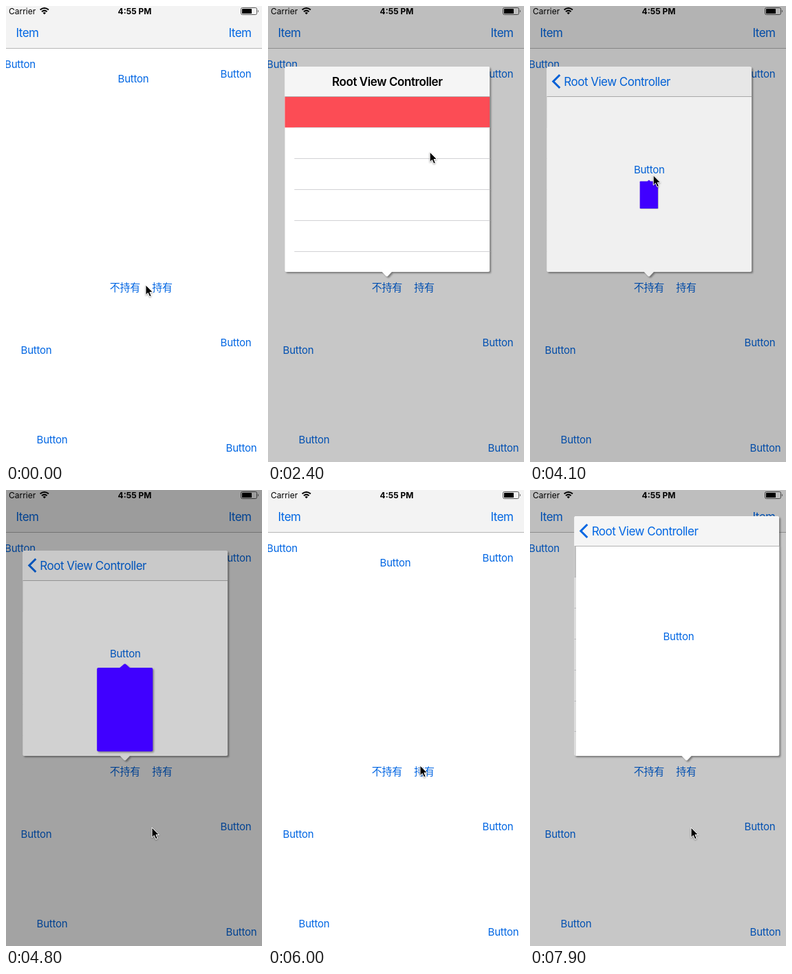
Recreate the animation shown at these times as an HTML page. Size 372 px wide and 662 px high, loop 8000 ms.

```html
<!DOCTYPE html>
<html lang="en">
<head>
<meta charset="utf-8">
<title>Popover demo</title>
<style>
html, body { margin: 0; width: 100%; height: 100%; overflow: hidden; background: #fff; }
svg { display: block; width: 100%; height: 100%; }
text { font-family: Inter, "Noto Sans CJK SC", "Noto Sans CJK", sans-serif; }
.btn { font-size: 15px; letter-spacing: -.24px; fill: #0066e3; text-anchor: middle; }
.nav { font-size: 17px; letter-spacing: -.5px; fill: #0066e3; }
.title { font-size: 17px; font-weight: 600; letter-spacing: -.41px; text-anchor: middle; }
.mid { text-anchor: middle; }
.status { font-size: 12px; }
.pop { filter: drop-shadow(2px 2px 1.2px rgba(0, 0, 0, .38)); }
</style>
</head>
<body>
<svg id="stage" viewBox="0 0 372 662">
  <rect width="372" height="662" fill="#fff"/>
  <rect width="372" height="61" fill="#f3f3f3"/>
  <rect y="61" width="372" height="1" fill="#b6b6b6"/>
  <text class="status" x="4" y="11.5">Carrier</text>
  <text class="status mid" x="187" y="11.5" font-weight="700">4:55 PM</text>
  <g fill="none" stroke="#000" stroke-width="2">
    <path d="M49.6 5.6Q55.8 .4 62 5.6M52 8.2Q55.8 5 59.6 8.2"/>
  </g>
  <path d="M53.6 9.9Q55.8 8.2 58 9.9L55.8 12.3Z"/>
  <rect x="341.5" y="2.5" width="23" height="10" rx="2" fill="none" stroke="#555"/>
  <rect x="343" y="4" width="14" height="7" rx=".6"/>
  <path d="M366 5.5Q368 7.5 366 9.5Z" fill="#555"/>
  <text class="nav mid" x="31" y="45.3">Item</text>
  <text class="nav mid" x="340" y="45.3">Item</text>
</svg>
<script>
const NS = 'http://www.w3.org/2000/svg';
const LOOP = 8000, STEP = 100, DIM = 0.22, W = 298, BAR = 43.6, ROW = 44.8;
const stage = document.getElementById('stage');

function add(parent, tag, attrs, text) {
  const el = document.createElementNS(NS, tag);
  for (const k in attrs) el.setAttribute(k, attrs[k]);
  if (text) el.textContent = text;
  parent.appendChild(el);
  return el;
}
const rect = (parent, x, y, width, height, fill, more) =>
  add(parent, 'rect', { x, y, width, height, fill, ...more });
const button = (parent, x, y, label = 'Button') =>
  add(parent, 'text', { class: 'btn', x, y: y + 5.3 }, label);
const dimmer = () => rect(stage, 0, 0, 372, 662, '#000', { opacity: 0 });
const move = (el, x, y = 0) => el.setAttribute('transform', `translate(${x} ${y})`);
const alpha = (el, a) => el.setAttribute('opacity', a);

[[20.5, 84.5], [185, 105.5], [334, 98.5], [44, 499.5], [334, 488.5], [67, 629.5], [342, 641.5]]
  .forEach(([x, y]) => button(stage, x, y));
button(stage, 172.8, 408.5, '不持有');
button(stage, 227, 408.5, '持有');

const outerDim = dimmer();

// Popover with a table and the pushed view; (ax, ay) is the arrow tip.
function tablePopover(id, x, y, h, ax, ay) {
  const root = add(stage, 'g', { class: 'pop' });
  const box = add(root, 'g', { transform: `translate(${x} ${y})` });
  const tip = ax - x;
  add(box, 'path', { d: `M${tip - 8} ${h - 1}h16L${tip + 1} ${ay - y - .5}h-2Z`, fill: '#fff' });
  const clip = add(box, 'clipPath', { id });
  rect(clip, 0, 0, W, h, '#000', { rx: 2.5 });
  const body = add(box, 'g', { 'clip-path': `url(#${id})` });

  const table = add(body, 'g', {});
  rect(table, 0, 0, W, h, '#fff');
  const cell = rect(table, 0, BAR, W, ROW, '#fc4c55');
  for (let i = 1; BAR + i * ROW < h; i++) rect(table, 14, Math.round(BAR + i * ROW), W, 1, '#d2d2d5');
  const shade = rect(body, 0, BAR, W, h, '#000');

  const page = add(body, 'g', {});
  rect(page, 0, BAR, W, h, '#fff');
  button(page, W / 2, h / 2 + .3);

  rect(body, 0, 0, W, BAR, '#f5f5f5');
  rect(body, 0, 43, W, 1, '#b4b4b4');
  const chevron = add(body, 'path', {
    d: 'M19 12L9.5 21.5L19 31', fill: 'none', stroke: '#0066e3', 'stroke-width': 3
  });
  const title = add(body, 'text', { class: 'title', x: W / 2, y: 27.6 }, 'Root View Controller');
  const back = add(body, 'text', { class: 'nav', x: 25, y: 27.6 }, 'Root View Controller');

  return (scale, push, picked) => {
    zoom(root, ax, ay, scale);
    cell.setAttribute('fill', picked ? '#d9d9d9' : '#fc4c55');
    move(table, -0.3 * W * push);
    alpha(shade, 0.14 * push);
    move(page, W * (1 - push));
    alpha(chevron, push);
    move(title, -45 * push);
    alpha(title, Math.max(0, 1 - 2 * push));
    move(back, 42 * (1 - push));
    alpha(back, Math.min(1, 2 * push));
  };
}

function zoom(el, ax, ay, s) {
  el.style.display = s > 0.01 ? '' : 'none';
  el.setAttribute('transform', `translate(${ax} ${ay}) scale(${s}) translate(${-ax} ${-ay})`);
}

const first = tablePopover('c1', 24.3, 88, 298, 172.8, 393);
const second = tablePopover('c2', 64.3, 38, 348, 227.5, 393);

const innerDim = dimmer();
const inner = add(stage, 'g', { class: 'pop' });
rect(inner, 123, 259, 99.4, 149, '#4000ff', { rx: 2.5 });
add(inner, 'path', { d: 'M162.5 260L171.5 252.5h2.4L182.5 260Z', fill: '#4000ff' });

const cursor = add(stage, 'path', {
  d: 'M0 0V14.5L3.3 11.5L5.7 17L8.2 15.9L5.9 10.6H10.4Z',
  stroke: '#fff', 'stroke-width': 1, style: 'filter:drop-shadow(0 1px 1px rgba(0,0,0,.35))'
});

const path = [
  [0, 203, 405], [400, 203, 405], [900, 182, 406], [1800, 182, 406],
  [2600, 245, 176], [3400, 245, 176], [3800, 178, 237], [4050, 178, 237],
  [4500, 212, 490], [5300, 212, 490], [5800, 221, 400], [6300, 221, 400],
  [6900, 243, 150], [7450, 243, 150], [7850, 234, 490], [LOOP, 234, 490]
];

const clamp = v => Math.min(1, Math.max(0, v));
const smooth = q => q * q * (3 - 2 * q);
const present = (t, at) => 1 - (1 - clamp((t - at) / 450)) ** 2.6;
const dismiss = (t, at) => 1 - smooth(clamp((t - at) / 365));
const slide = (t, at) => {
  const k = 0.017 * Math.max(0, t - at);
  return 1 - Math.exp(-k) * (1 + k);
};

function draw(t) {
  const a = present(t, 1200) * dismiss(t, 5200);
  const b = present(t, 6150);
  const c = present(t, 4050) * dismiss(t, 4700);
  alpha(outerDim, DIM * Math.max(a, b));
  alpha(innerDim, DIM * c);
  first(a, slide(t, 3163), t >= 3100);
  second(b, slide(t, 7500), t >= 7500);
  zoom(inner, 172.8, 253, c);

  const i = path.findIndex(p => p[0] > t);
  const [t0, x0, y0] = path[i - 1], [t1, x1, y1] = path[i];
  const q = smooth((t - t0) / (t1 - t0));
  move(cursor, x0 + (x1 - x0) * q, y0 + (y1 - y0) * q);
}

const start = performance.now();
function tick() {
  const t = (performance.now() - start) % LOOP;
  draw(Math.floor(t / STEP) * STEP);
  requestAnimationFrame(tick);
}
tick();
</script>
</body>
</html>
```
